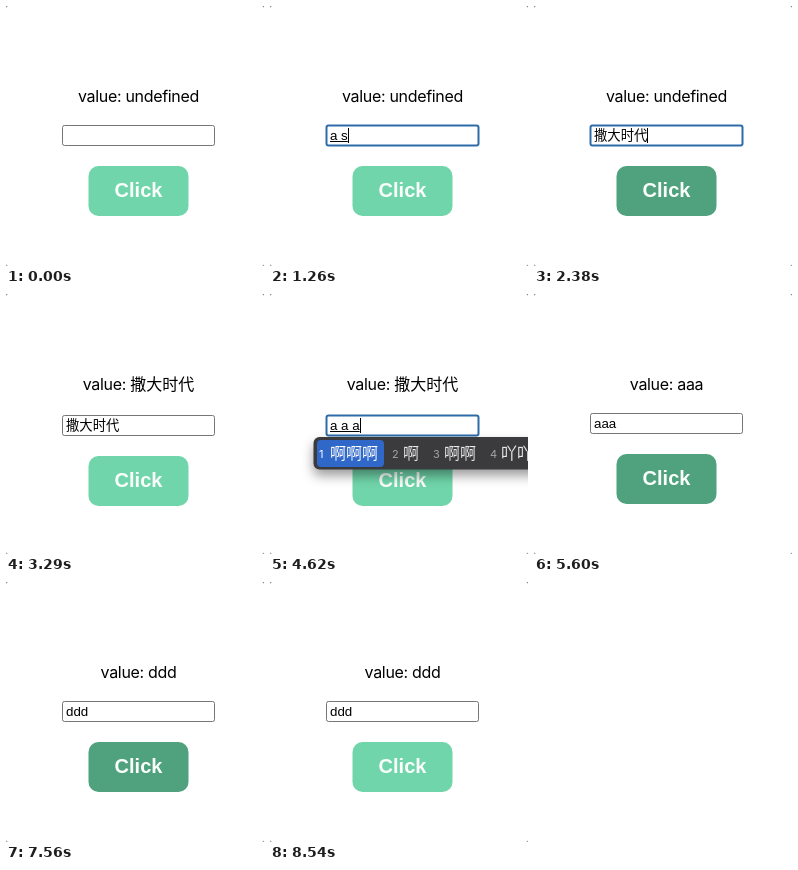
These frames come from a looping animation (258 px wide and 260 px high, 8750 ms). An HTML page:

```html
<!DOCTYPE html>
<html lang="zh-CN">
<head>
<meta charset="utf-8">
<style>
  html, body { margin: 0; width: 100%; height: 100%; overflow: hidden; background: #777; }
  svg { display: block; width: 258px; height: 260px; }
  .value { font: 16px Inter, "Noto Sans CJK SC", sans-serif; letter-spacing: -.32px; text-anchor: middle; }
  .value .cjk { letter-spacing: 0; }
  .field { font: 13.333px "Liberation Sans", "Noto Sans CJK SC", sans-serif; }
  .label { font: bold 20px "Liberation Sans", sans-serif; text-anchor: middle; fill: #fafffc; }
  .menu { filter: drop-shadow(0 6px 6px rgba(0, 0, 0, .4)); }
  .number { font: 11px Inter, sans-serif; fill: #a4a4a6; }
  .word { font: 16px "Noto Sans CJK SC", sans-serif; fill: #e8e8ea; }
  .picked { fill: #fff; }
</style>
</head>
<body>
<svg id="stage" viewBox="0 0 258 260"></svg>
<script>
const LOOP = 8750, TEXT_X = 60, CENTER = 132.5;
const stage = document.getElementById('stage');
const ctx = document.createElement('canvas').getContext('2d');
ctx.font = '13.333px "Liberation Sans", "Noto Sans CJK SC", sans-serif';
const widthOf = text => ctx.measureText(text).width;

// Each step changes part of the state: [time in ms, changes]
const compose = (text, menu = '') => ({ text, menu, composing: true, selected: 0 });
const commit = text => ({ text, menu: '', composing: false });
const click = value => ({ value, focus: false });
const steps = [
  [0, { value: 'undefined', text: '', menu: '', composing: false, selected: 0, focus: false, hover: false }],
  [210, { focus: true }],
  [1260, compose('a s')],
  [1330, compose('a s', '按时 啊 安 爱上')],
  [1400, compose('a s d', '阿萨德 按时 啊 安')],
  [1540, compose('a s d s', '撒大声 按时 啊 安')],
  [1680, compose('a s d s d', '撒大时代 按时 啊 安')],
  [1960, commit('撒大时代')],
  [2380, { hover: true }],
  [2590, click('撒大时代')],
  [3290, { hover: false }],
  [3780, { focus: true }],
  [3850, { selected: 1 }],
  [3920, { selected: 3 }],
  [4060, { selected: 4 }],
  [4340, compose('a')],
  [4410, compose('a', '啊 阿 吖 呵')],
  [4480, compose('a a', '啊啊 啊 阿 吖吖')],
  [4620, compose('a a a', '啊啊啊 啊 啊啊 吖吖')],
  [4970, commit('aaa')],
  [5390, { hover: true }],
  [5530, click('aaa')],
  [6020, { hover: false }],
  [6440, { focus: true }],
  [6650, { selected: 1 }],
  [6720, { selected: 3 }],
  [6860, { text: 'd', selected: 0 }],
  [6930, { text: 'dd' }],
  [7000, { text: 'ddd' }],
  [7140, { hover: true }],
  [7420, click('ddd')],
  [8400, { hover: false }],
];
let state = {};
const states = steps.map(([time, changes]) => state = { ...state, ...changes, time });

const rect = (x, y, w, h, r, fill, extra = '') =>
  `<rect x="${x}" y="${y}" width="${w}" height="${h}" rx="${r}" fill="${fill}" ${extra}/>`;
const label = (cls, x, y, content) => `<text class="${cls}" x="${x}" y="${y}">${content}</text>`;

function drawField({ text, focus, composing, selected }) {
  const end = TEXT_X + widthOf(text);
  const stroke = focus ? 'stroke="#2d6ca8" stroke-width="2"' : 'stroke="#767676"';
  let out = rect(56.5, 119.5, 152, 20, 2, '#fff', stroke);
  if (selected) {
    const start = TEXT_X + widthOf(text.slice(0, -selected));
    out += rect(start, 122, end - start, 15, 0, '#b4d5fe');
  }
  out += label('field', TEXT_X, 134, text);
  if (composing) out += rect(TEXT_X, 135, end - TEXT_X, 1, 0, '#000');
  if (focus && !selected) out += rect(Math.round(end), 122, 1, 15, 0, '#000');
  return out;
}

function drawMenu(words) {
  let x = 49;
  let out = `<g class="menu">${rect(43.5, 141, 240, 32.5, 6, '#3b3b3e')}</g>`;
  words.split(' ').forEach((word, i) => {
    const picked = i ? '' : ' picked', width = 16 * word.length;
    if (picked) out += rect(47, 144, width + 19, 27, 4, '#2f68c9');
    out += label('number' + picked, x, 161.5, i + 1) + label('word' + picked, x + 11, 163, word);
    x += width + 25;
  });
  return out;
}

function draw(s) {
  const isCjk = s.value > '\u4e00';
  const value = isCjk ? `<tspan class="cjk">${s.value}</tspan>` : s.value;
  stage.innerHTML = rect(0, 0, 258, 260, 2.5, '#fff') +
    label('value', CENTER, 96, 'value: ' + value) +
    `<g transform="translate(0 ${isCjk ? 2 : 0})">` +
    drawField(s) +
    rect(82.5, 160, 100, 50, 10, s.hover ? '#4fa27d' : '#70d5aa') +
    label('label', CENTER, 191, 'Click') +
    (s.menu && drawMenu(s.menu)) + '</g>';
}

let shown;
function tick() {
  const time = performance.now() % LOOP;
  const current = states.findLast(s => s.time <= time);
  if (current !== shown) draw(shown = current);
  requestAnimationFrame(tick);
}
tick();
</script>
</body>
</html>
```
